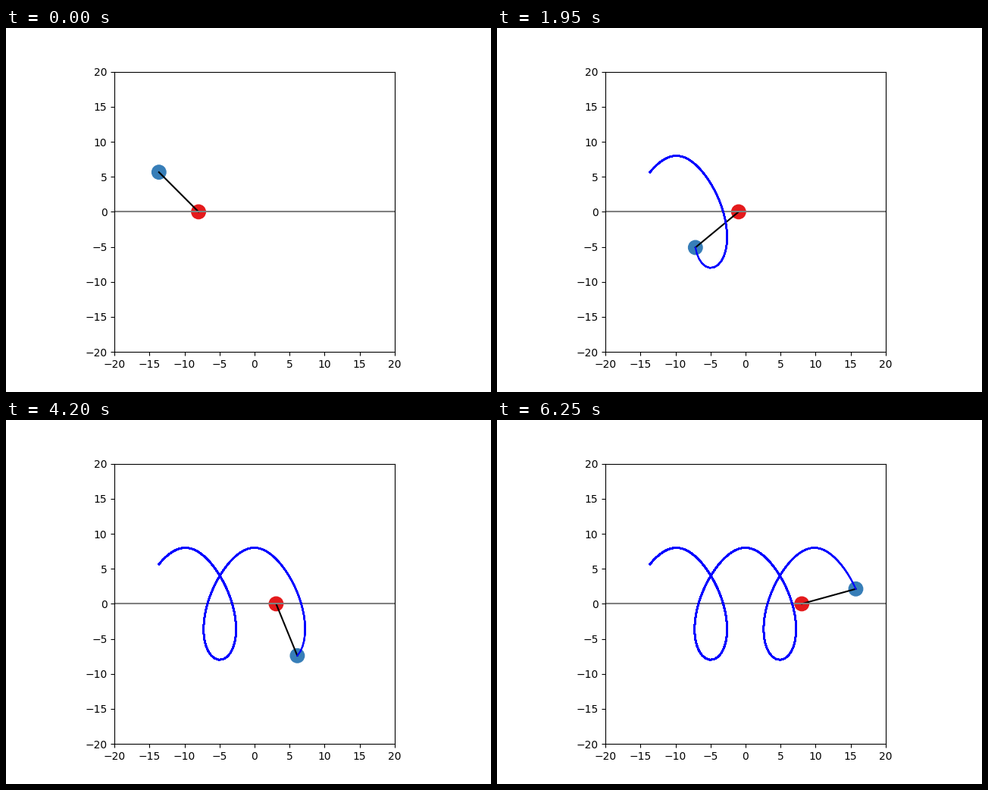
These frames come from a looping animation (640x480 px, 6.3 s). A matplotlib script:

```python
import numpy as np
import matplotlib.pyplot as plt
from matplotlib.animation import FuncAnimation
from matplotlib.patches import Circle

FRAMES, DT, SUBSTEPS = 126, 0.05, 10
G, LENGTH, RATIO = 9.8, 8.0, 0.5   # RATIO = bob mass / total mass


def deriv(state):
    """State is slider x, rod angle from upright, and their speeds."""
    _, a, vx, va = state
    s, c = np.sin(a), np.cos(a)
    d = 1 - RATIO * c * c
    ax_ = RATIO * s * (LENGTH * va**2 + G * c) / d
    aa = s * (G / LENGTH - RATIO * va**2 * c) / d
    return np.array([vx, va, ax_, aa])


def rk4(state, h):
    k1 = deriv(state)
    k2 = deriv(state + h / 2 * k1)
    k3 = deriv(state + h / 2 * k2)
    k4 = deriv(state + h * k3)
    return state + h / 6 * (k1 + 2 * k2 + 2 * k3 + k4)


def simulate():
    state = np.array([-8.0, -np.pi / 4, -2.0, 2.0])
    states = [state]
    for _ in range(FRAMES - 1):
        for _ in range(SUBSTEPS):
            state = rk4(state, DT / SUBSTEPS)
        states.append(state)
    return np.array(states)


path = simulate()
slider_x, angle = path[:, 0], path[:, 1]
bob_x = slider_x + LENGTH * np.sin(angle)
bob_y = LENGTH * np.cos(angle)

fig, ax = plt.subplots(figsize=(6.4, 4.8), dpi=100)
ax.set_aspect("equal")
ax.set_xlim(-20, 20)
ax.set_ylim(-20, 20)
ticks = np.arange(-20, 21, 5)
ax.set_xticks(ticks)
ax.set_yticks(ticks)

slider = ax.add_patch(Circle((0, 0), 1, color="#e41a1c"))
bob = ax.add_patch(Circle((0, 0), 1, color="#377eb8"))
rod, = ax.plot([], [], color="black", lw=1.5)
ax.plot([-20, 20], [0, 0], color="gray", lw=1.5)

# Each step lays the whole trail down again, so older parts look heavier.
trails = [ax.plot(bob_x[:i + 1], bob_y[:i + 1], color="blue", lw=1.5)[0]
          for i in range(1, FRAMES)]


def update(n):
    slider.center = slider_x[n], 0
    bob.center = bob_x[n], bob_y[n]
    rod.set_data([slider_x[n], bob_x[n]], [0, bob_y[n]])
    for i, trail in enumerate(trails, 1):
        trail.set_visible(i <= n)
    return [slider, bob, rod, *trails]


anim = FuncAnimation(fig, update, frames=FRAMES, interval=50,
                     repeat=True, repeat_delay=0, blit=False)
plt.show()
```
